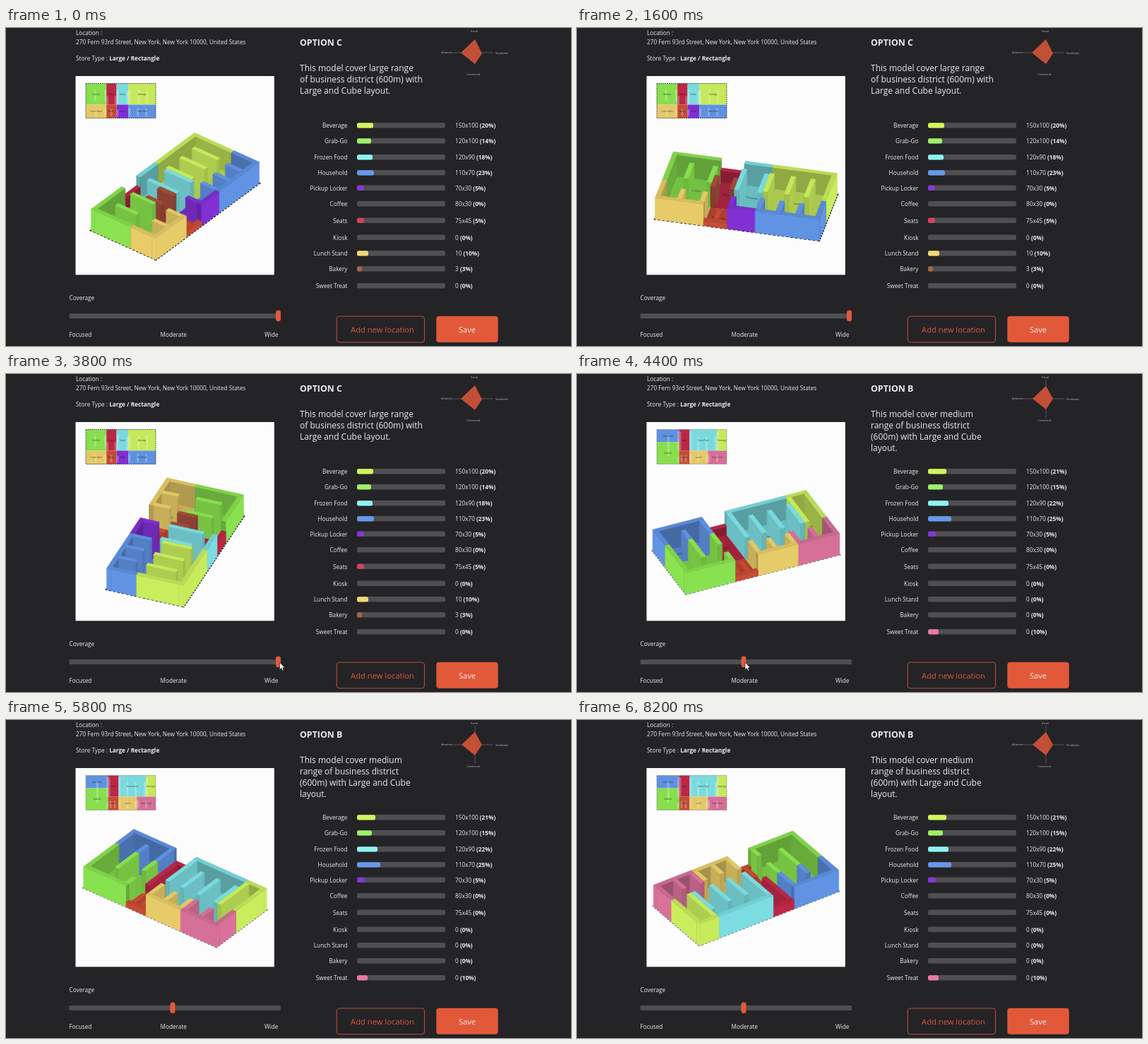
An HTML page with a canvas that plays this animation: 800x450 px, repeating every 8.4 s.

```html
<!DOCTYPE html>
<html lang="en">
<head>
<meta charset="utf-8">
<title>Store layout options</title>
<style>
  html, body { margin: 0; width: 100%; height: 100%; overflow: hidden; background: #242326; }
  svg { position: absolute; left: 0; top: 0; }
  canvas { position: absolute; left: 99px; top: 68px; }
  text { font-family: "Open Sans", "Noto Sans", sans-serif; font-size: 8.25px; fill: #ebebeb; white-space: pre; }
  .b { font-weight: 700; }
  .head { font-size: 12.4px; font-weight: 700; }
  .para { font-size: 12px; }
  .btn { font-size: 11.2px; text-anchor: middle; }
  .tiny { font-size: 3.4px; text-anchor: middle; fill: #c4c4c4; }
  .end { text-anchor: end; }
  .track { fill: #4f4e50; }
  .axis { stroke: #6c6b6f; stroke-width: .7; }
  .radar { fill: #c44f37; }
</style>
</head>
<body>
<svg width="800" height="450" viewBox="0 0 800 450">
  <text x="99" y="10">Location :</text>
  <text x="99" y="23">270 Fern 93rd Street, New York, New York 10000, United States</text>
  <text x="99" y="46">Store Type : <tspan class="b">Large / Rectangle</tspan></text>
  <rect x="98.5" y="68" width="281.3" height="281.3" fill="#fdfcfd"/>

  <path class="axis" d="M632 35H690"/>
  <text class="tiny" x="663" y="6">Transit</text>
  <text class="tiny" x="624" y="36">Attraction</text>
  <text class="tiny" x="702" y="36.5">Residential</text>
  <text class="tiny" x="662" y="67">Commercial</text>

  <g id="rows"></g>
  <g id="optC"></g>
  <g id="optB"></g>

  <text x="89.5" y="385">Coverage</text>
  <rect class="track" x="89.5" y="404" width="299.5" height="7" rx="2"/>
  <text x="89.5" y="437">Focused</text>
  <text x="218.5" y="437">Moderate</text>
  <text class="end" x="385.5" y="437">Wide</text>

  <rect x="468.3" y="408" width="124.2" height="36.7" rx="4" fill="none" stroke="#b54e38" stroke-width="1.1"/>
  <text class="btn" x="533" y="431" style="fill:#d9583c">Add new location</text>
  <rect x="609.3" y="407.7" width="87.4" height="37" rx="4" fill="#e2593a"/>
  <text class="btn" x="653" y="431">Save</text>

  <rect id="knob" y="399.5" width="7" height="15.5" rx="3" fill="#e2593a"/>
  <path id="cursor" d="M0 0V10.5L2.4 8.3L4 12L5.7 11.2L4.1 7.7H7.4Z" fill="#fff" stroke="#222" stroke-width=".7"/>
</svg>
<canvas width="281" height="281"></canvas>

<script>
const $ = id => document.getElementById(id);
const LOOP = 8400, STEP = 200, SWITCH = 4200;

// ---- side panel ----
const names = ['Beverage', 'Grab-Go', 'Frozen Food', 'Household', 'Pickup Locker', 'Coffee',
  'Seats', 'Kiosk', 'Lunch Stand', 'Bakery', 'Sweet Treat'];
const rowY = [138, 160, 183, 205, 226.5, 249, 272.5, 296.5, 319, 341, 365];
const barColors = ['#d3f55c', '#9df169', '#8df3f0', '#6699ec', '#8436d8', '', '#d14160', '', '#f1d975', '#a3654b', '#e87a9f'];
const sizes = ['150x100', '120x100', '120x90', '110x70', '70x30', '80x30', '75x45', '0'];

const panels = {
  C: {
    lines: ['This model cover large range', 'of business district (600m) with', 'Large and Cube layout.'],
    sizes: [...sizes, '10', '3', '0'],
    share: [20, 14, 18, 23, 5, 0, 5, 0, 10, 3, 0],
    bars: [23, 20, 22, 24, 10, 0, 10, 0, 16, 7, 0],
    radar: '<path class="radar" d="M664 16L674 36L664 51L644 35Z"/>'
  },
  B: {
    lines: ['This model cover medium', 'range of business district', '(600m) with Large and Cube', 'layout.'],
    sizes: [...sizes, '0', '0', '0'],
    share: [21, 15, 22, 25, 5, 0, 0, 0, 0, 0, 10],
    bars: [26, 21, 29, 33, 11, 0, 0, 0, 0, 0, 15],
    radar: '<path class="axis" d="M664 8V62"/><path class="radar" d="M664 17L674 35L664 50L645 35Z"/>'
  }
};

$('rows').innerHTML = names.map((n, i) =>
  `<text class="end" x="483.5" y="${rowY[i] + 3}">${n}</text>
   <rect class="track" x="497" y="${rowY[i] - 4}" width="125" height="7.6" rx="2.5"/>`).join('');

for (const key in panels) {
  const p = panels[key];
  $('opt' + key).innerHTML = `<text class="head" x="416" y="24.5">OPTION ${key}</text>` + p.radar +
    p.lines.map((s, i) => `<text class="para" x="416" y="${60.7 + 16 * i}">${s}</text>`).join('') +
    names.map((_, i) =>
      `<rect x="497" y="${rowY[i] - 3.8}" width="${p.bars[i]}" height="7.2" rx="2.5" fill="${barColors[i]}"/>
       <text x="636" y="${rowY[i] + 3}">${p.sizes[i]} <tspan class="b">(${p.share[i]}%)</tspan></text>`).join('');
}

// ---- store model: plan is 100 x 49 units ----
const PW = 100, PH = 49, WALL = 2.8, HIGH = 30, FRONT = PH - WALL;
const K = 2.38, TILT = 0.577, CX = 239.5, CY = 253;
const col = {
  green: '#8eea52', yellow: '#f0d36c', crimson: '#c4294a', orange: '#cf4f37', cyan: '#80e6ea',
  purple: '#8632dc', lime: '#d0f560', blue: '#6499ec', pink: '#e0759f', brown: '#a84f3d'
};

// shelves: [x, y start, y end, own colour]
const room = (color, x0, y0, x1, y1, label, shelves, h = HIGH) => ({ color: col[color], x0, y0, x1, y1, label, shelves, h });

const planC = [
  room('green', 0, 0, 29.5, 30, 'Grab-Go', [[12, 9, 25], [26.5, 9, 26]]),
  room('yellow', 0, 30, 29.5, 49, 'Lunch Stand', [[13, 36, FRONT], [26.5, 36, FRONT]]),
  room('crimson', 29.5, 0, 44, 30, 'Seats', [[29.5, 18, 30, col.brown], [41, 18, 30, col.brown]], 16),
  room('orange', 29.5, 30, 44, 49, 'Bakery', [[35, 36, FRONT]], 7),
  room('cyan', 44, 0, 61, 30, 'Frozen', [[44, 8, 30], [58, 10, 30]]),
  room('purple', 44, 30, 61, 49, 'Locker', [[44, 37, FRONT]]),
  room('lime', 61, 0, 100, 30, 'Beverage', [[61, 9, 28], [74, 9, 28], [86, 9, 28]]),
  room('blue', 61, 30, 100, 49, 'Household', [[61, 35, FRONT], [73, 35, FRONT], [85, 35, FRONT]])
];
const planB = [
  room('blue', 0, 0, 32, 18, 'Household', [[15, 8, 18], [29.2, WALL, 18]]),
  room('green', 0, 18, 32, 49, 'Grab-Go', [[15, 18, 38], [29.2, 18, 30], [29.2, 39, FRONT]]),
  room('crimson', 32, 0, 47, 30, 'Seats', [[32, WALL, 30]], 12),
  room('orange', 32, 30, 47, 49, 'Locker', [[34, 36, FRONT], [40, 36, FRONT]], 7),
  room('cyan', 47, 0, 86, 30, 'Frozen Food', [[47, WALL, 30], [58, 10, 30], [70, 10, 30], [83, 9, 30]]),
  room('lime', 86, 0, 100, 30, 'Beverage', [[86, WALL, 30]]),
  room('yellow', 47, 30, 73, 49, 'Lunch', [[47, 34, FRONT], [58, 36, FRONT], [70, 36, FRONT]]),
  room('pink', 73, 30, 100, 49, 'Sweet Treat', [[73, 35, FRONT], [85, 36, FRONT]])
];

// Every room edge on the outline becomes a wall.
function boxesOf(plan) {
  const out = [];
  for (const r of plan) {
    const add = (x0, y0, x1, y1, extra) => out.push({ x0, y0, x1, y1, color: r.color, h: r.h, ...extra });
    const top = r.y0 === 0, bottom = r.y1 === PH;
    const a = r.y0 + (top ? WALL : 0), b = r.y1 - (bottom ? WALL : 0);
    if (top) add(r.x0, 0, r.x1, WALL);
    if (bottom) add(r.x0, FRONT, r.x1, PH);
    if (r.x0 === 0) add(0, a, WALL, b);
    if (r.x1 === PW) add(PW - WALL, a, PW, b);
    for (const [x, y0, y1, own] of r.shelves)
      add(x, y0, x + WALL, y1, { shelf: true, ...(own && { color: own, h: HIGH }) });
  }
  return out;
}
const models = { C: { plan: planC, boxes: boxesOf(planC) }, B: { plan: planB, boxes: boxesOf(planB) } };

const ctx = document.querySelector('canvas').getContext('2d');

function drawPlan(plan, floor) {
  ctx.textAlign = 'center';
  for (const r of plan) {
    const w = r.x1 - r.x0, h = r.y1 - r.y0;
    ctx.fillStyle = r.color;
    ctx.fillRect(r.x0, r.y0, w, h);
    ctx.fillStyle = `rgba(0,0,0,${floor ? .18 : .05})`;
    ctx.fillRect(r.x0, r.y0, w, h);
    if (!floor) {
      ctx.fillStyle = 'rgba(255,255,255,.25)';
      for (const [x, y0, y1] of r.shelves) ctx.fillRect(x, y0, WALL, y1 - y0);
    }
    ctx.fillStyle = 'rgba(20,20,20,.75)';
    ctx.font = '2.8px "Open Sans", sans-serif';
    ctx.fillText(r.label, r.x0 + w / 2, r.y0 + h / 2 + 1);
  }
}

function outline(width, dash, color) {
  ctx.strokeStyle = color;
  ctx.lineWidth = width;
  ctx.setLineDash(dash);
  ctx.strokeRect(0, 0, PW, PH);
  ctx.setLineDash([]);
}

function sortBoxes(boxes, sin, cos) {
  const behind = (a, b) =>
    (sin > 0 ? a.x1 <= b.x0 : a.x0 >= b.x1) || (cos > 0 ? a.y1 <= b.y0 : a.y0 >= b.y1);
  const done = new Set(), out = [];
  const visit = b => {
    if (done.has(b)) return;
    done.add(b);
    for (const a of boxes) if (a !== b && behind(a, b) && !behind(b, a)) visit(a);
    out.push(b);
  };
  boxes.forEach(visit);
  return out;
}

function face(points, color, dark) {
  ctx.beginPath();
  points.forEach(p => ctx.lineTo(p[0], p[1]));
  ctx.closePath();
  ctx.lineWidth = .4;
  for (const c of [color, `rgba(0,0,0,${dark})`]) {
    ctx.fillStyle = ctx.strokeStyle = c;
    ctx.fill();
    ctx.stroke();
  }
}

function drawModel({ plan, boxes }, deg, dashColor) {
  const a = deg * Math.PI / 180, sin = Math.sin(a), cos = Math.cos(a);
  const at = (x, y, z) => {
    x -= PW / 2; y -= PH / 2;
    return [CX + K * (x * cos - y * sin), CY + K * TILT * (x * sin + y * cos) - z];
  };
  ctx.setTransform(1, 0, 0, 1, 0, 0);
  ctx.clearRect(0, 0, 281, 281);
  ctx.translate(-99, -68);

  ctx.save();
  ctx.translate(113, 78.5);
  ctx.scale(.99, 1);
  drawPlan(plan, false);
  outline(.8, [1.6, 1.3], dashColor);
  ctx.restore();

  ctx.save();
  ctx.transform(K * cos, K * TILT * sin, -K * sin, K * TILT * cos, CX, CY);
  ctx.translate(-PW / 2, -PH / 2);
  outline(1.4, [1.7, 1], dashColor);
  drawPlan(plan, true);
  ctx.restore();

  for (const { x0, y0, x1, y1, h, color, shelf } of sortBoxes(boxes, sin, cos)) {
    const x = sin > 0 ? x1 : x0, y = cos > 0 ? y1 : y0;
    const inner = shelf ? .17 : .27;
    const darkX = x === 0 || x === PW ? .03 : inner;
    const darkY = y === 0 || y === PH ? .04 : inner + .04;
    face([at(x, y0, 0), at(x, y1, 0), at(x, y1, h), at(x, y0, h)], color, darkX);
    face([at(x0, y, 0), at(x1, y, 0), at(x1, y, h), at(x0, y, h)], color, darkY);
    face([at(x0, y0, h), at(x1, y0, h), at(x1, y1, h), at(x0, y1, h)], color, shelf ? .05 : .1);
  }
}

// ---- timeline ----
function track(keys, t) {
  let i = 1;
  while (i < keys.length - 1 && t > keys[i][0]) i++;
  const [t0, v0] = keys[i - 1], [t1, v1] = keys[i];
  return v0 + (v1 - v0) * (t - t0) / (t1 - t0);
}
const clamp = (v, lo, hi) => Math.min(hi, Math.max(lo, v));
const spinC = [[0, -52], [1600, 12.8], [2800, 66], [4200, 129]];
const spinB = [[4200, -33], [4400, -24], [5800, 37.7], [7200, 98], [8200, 146]];

let last = -1;
function frame(now) {
  const t = Math.floor(now % LOOP / STEP) * STEP;
  if (t !== last) {
    last = t;
    const isC = t < SWITCH;
    $('optC').style.display = isC ? '' : 'none';
    $('optB').style.display = isC ? 'none' : '';
    drawModel(models[isC ? 'C' : 'B'], track(isC ? spinC : spinB, t), isC ? '#111' : '#777');

    const knob = track([[3800, 382], [SWITCH, 232.5]], clamp(t, 3800, SWITCH));
    $('knob').setAttribute('x', knob);
    const rise = 42 * (1 - clamp((t - 3400) / 400, 0, 1));
    $('cursor').setAttribute('transform', `translate(${knob + 5.5} ${408 + rise})`);
    $('cursor').style.display = t >= 3400 && t < 5000 ? '' : 'none';
  }
  requestAnimationFrame(frame);
}
frame(performance.now());
</script>
</body>
</html>
```
